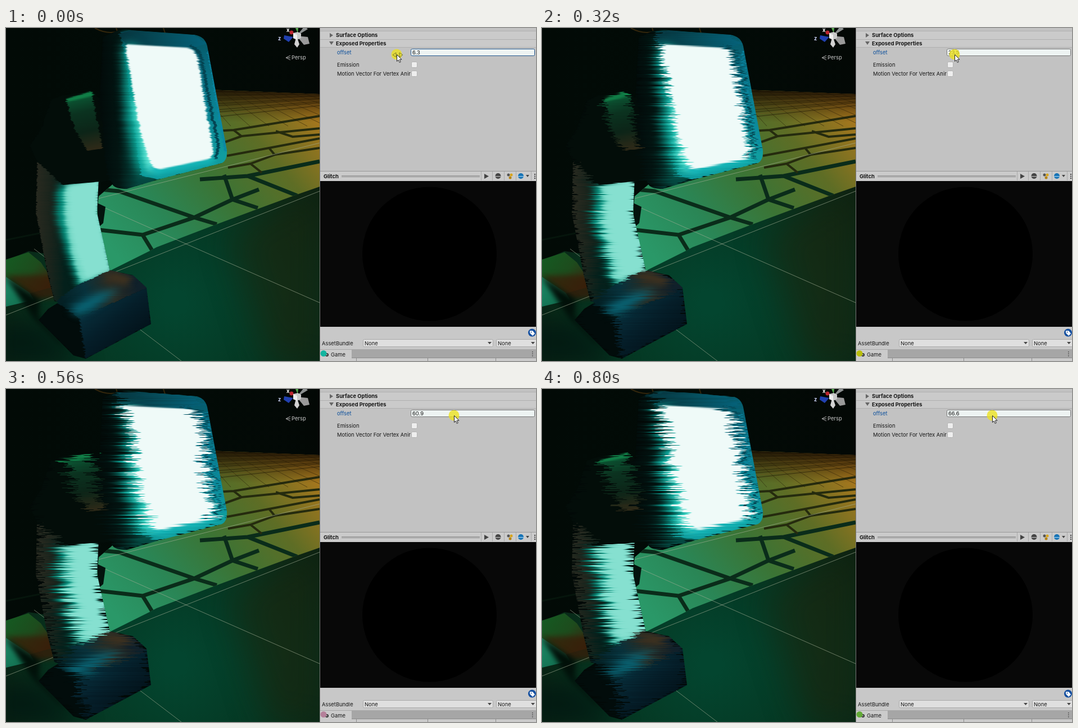
Write an HTML page with a canvas that moves like this. It is 943 px wide and 594 px high and loops after 840 ms.

```html
<!DOCTYPE html>
<html lang="en">
<head>
<meta charset="utf-8">
<title>Glitch offset</title>
<style>
html, body { margin: 0; height: 100%; overflow: hidden; background: #c2c2c2; }
canvas { display: block; }
</style>
</head>
<body>
<canvas id="stage" width="943" height="594"></canvas>
<script>
const W = 943, H = 594, VIEW = 558, LAMP_W = 420, LOOP = 840, STEP = 40;
const stage = document.getElementById('stage').getContext('2d');

function layer(width) {
  const canvas = document.createElement('canvas');
  canvas.width = width;
  canvas.height = H;
  return canvas.getContext('2d');
}

function fill(c, d, color, blur = 0) {
  c.filter = blur ? `blur(${blur}px)` : 'none';
  c.fillStyle = color;
  c.fill(new Path2D(d));
  c.filter = 'none';
}

function line(c, d, color, width = 1) {
  c.strokeStyle = color;
  c.lineWidth = width;
  c.stroke(new Path2D(d));
}

function rect(c, x, y, w, h, color) {
  c.fillStyle = color;
  c.fillRect(x, y, w, h);
}

function disc(c, x, y, r, color) {
  c.fillStyle = color;
  c.beginPath();
  c.arc(x, y, r, 0, 7);
  c.fill();
}

function text(c, s, x, y, color = '#161616', weight = 400) {
  c.font = `${weight} 9.4px Inter, sans-serif`;
  c.fillStyle = color;
  c.fillText(s, x, y);
}

function box(c, x, y, w, h, color, border) {
  c.beginPath();
  c.roundRect(x + .5, y + .5, w, h, 2);
  c.fillStyle = color;
  c.fill();
  c.strokeStyle = border;
  c.lineWidth = 1;
  c.stroke();
}

// Spreads the colours evenly between two points
function blend(c, x0, y0, x1, y1, ...colors) {
  const g = c.createLinearGradient(x0, y0, x1, y1);
  colors.forEach((color, i) => g.addColorStop(i / (colors.length - 1), color));
  return g;
}

function drawFloor(c) {
  c.save();
  c.beginPath();
  c.rect(0, 0, VIEW, H);
  c.clip();
  rect(c, 0, 0, VIEW, H, blend(c, 0, 0, VIEW, 0, '#020a06', '#020b07', '#030805'));
  line(c, 'M158 0Q180 12 200 6M196 0 200 12M280 0 284 12', '#33260c', 2);
  line(c, 'M0 378 60 366', '#06150c', 3);

  const glow = c.createRadialGradient(300, 490, 20, 300, 490, 330);
  glow.addColorStop(0, '#03452f');
  glow.addColorStop(.5, '#053823');
  glow.addColorStop(1, '#0b2212');
  fill(c, 'M0 415 40 398 185 420 558 270V594H0Z', glow);
  fill(c, 'M558 275V594H470L400 370Z', 'rgba(32,34,10,.5)', 30);

  // Lit patch and shadow left of the lamp
  fill(c, 'M0 413 40 400 62 418 90 460 40 474 0 445Z', blend(c, 0, 410, 80, 470, '#155a22', '#1d4c1d', '#3a2410'));
  fill(c, 'M0 444 42 472 50 485 0 497Z', blend(c, 0, 450, 50, 490, '#1c8462', '#127050'));
  fill(c, 'M0 442 85 440 100 480 52 484Z', 'rgba(58,28,8,.75)', 5);
  fill(c, 'M0 445 60 484 58 515 110 575 90 560 50 520Z', '#021009', 5);
  fill(c, 'M-20 525 60 520 140 600H-20Z', 'rgba(2,24,18,.8)', 20);

  // Lit tiles
  c.save();
  c.clip(new Path2D('M165 300 200 270 360 110 558 118V283L515 298 450 322 367 353 268 391 255 398 185 433 160 340Z'));
  rect(c, 150, 100, 420, 340, blend(c, 200, 410, 540, 140, '#2a9868', '#2a8656', '#3b7435', '#5e6d25', '#a8771d'));
  line(c, 'M168 288 200 291 335 338 375 350M388 262 403 306 335 338 243 369 165 360M403 306 448 321' +
    'M243 369 262 400M345 270 430 264 558 238M430 264 518 299M403 306 450 288', '#0a2c1a', 7);
  line(c, 'M370 184 405 182 558 157M405 182 419 193 558 179M419 193 380 207M393 228 468 214 558 197' +
    'M468 214 478 226 435 242 395 249M478 226 558 214M435 242 455 258M480 184 510 194 558 190', '#252b0e', 4);
  for (let i = 0; i < 17; i++) {
    const y = 110 + i * 1.7 + i * i * .09;
    line(c, `M360 ${y}L558 ${y + 7 - i * 1.8}`, i % 3 ? 'rgba(22,18,4,.65)' : 'rgba(190,130,50,.35)');
    line(c, `M${340 + i * 18} 108L${400 + i * 34} 175`, 'rgba(35,25,5,.5)');
  }
  rect(c, 350, 108, 208, 60, blend(c, 0, 108, 0, 168, 'rgba(22,13,3,.95)', 'rgba(50,32,6,.55)', 'rgba(60,40,8,0)'));
  c.restore();

  line(c, 'M0 512 558 291M165 316 320 385 558 490M50 394 312 594M165 304 558 205', 'rgba(165,175,150,.6)');
  fill(c, 'M162 312 177 319 173 348 164 356Z', '#03130d');
  c.restore();
}

const HEAD = 'M172 16 200 4Q212 1 225 4L335 12Q354 15 358 32L393 218Q394 236 384 241L272 270 215 287Q195 287 190 280L180 262 166 130Z';
const ARM = 'M80 128 100 120 152 112 172 130 190 272 100 280 55 238 42 210 62 180Z';
const LEG = 'M55 237 100 270 165 268 162 330 185 434 125 470 100 492 86 487 74 440 53 330Z';
const BASE = 'M58 521 75 501 96 488 125 460 185 432 226 441 250 463 258 528 142 590 120 584Z';

function drawMask(c) {
  for (const d of [HEAD, ARM, LEG, BASE]) fill(c, d, '#000');
}

// Painted a little past the outline, so shifted rows never run out of colour
function drawLamp(c) {
  rect(c, 0, 0, LAMP_W, H, '#020907');

  fill(c, LEG, blend(c, 53, 0, 105, 0, '#292a20', '#1a241c', '#04201b'));
  fill(c, 'M92 282 165 272 162 330 185 433 128 462 108 400 90 340Z', '#07917f', 6);
  fill(c, 'M104 281 165 271 163 330 185 433 132 455 116 400 104 340Z', '#74d8c6', 3);
  fill(c, 'M112 282 165 271 163 330 185 433 142 447 124 395 112 340Z', '#86e0d0', 3);

  fill(c, ARM, '#030d09');
  fill(c, 'M107 127 152 113 172 215 145 219 122 180Z', blend(c, 130, 115, 155, 218, '#0c6039', '#0b3320', '#0c2518', '#302a18'));
  fill(c, 'M107 127 152 113 155 121 112 131Z', '#118048', 1.5);

  fill(c, BASE, '#020c0b');
  fill(c, 'M88 488 125 460 185 432 226 441 252 463 130 517Z', blend(c, 100, 490, 230, 450, '#042024', '#08323c', '#2a2c24', '#10202a'));
  fill(c, 'M130 517 252 463 258 528 142 590Z', blend(c, 150, 490, 215, 570, '#08313e', '#051e29', '#03121a'));
  fill(c, 'M112 500 165 473 205 465 150 502 128 513Z', '#0a6676', 7);
  fill(c, 'M168 446 195 436 224 446 215 460Z', '#40321f', 6);

  fill(c, HEAD, blend(c, 165, 0, 235, 0, '#020a09', '#031512', '#05463f'));
  fill(c, 'M203 7 222 4 335 12 420 20V245L384 241 272 270 240 264 212 60Z',
    blend(c, 260, 0, 345, 240, '#044650', '#07677a', '#0a8192', '#109c9f'));
  fill(c, 'M200 10 225 4 335 12 357 28 330 36 212 29Z', blend(c, 200, 0, 355, 0, '#07343d', '#064c5a', '#05627a'));
  line(c, 'M328 31 345 45 378 210 374 234', '#044452', 5);
  line(c, 'M360 40 391 220', '#0b87a5', 4);
  fill(c, 'M207 30 232 30 275 255 235 258 215 170Z', '#0ba698', 9);
  fill(c, 'M225 130 245 130 275 253 250 255Z', '#63e8d8', 6);
  fill(c, 'M250 248 368 228 372 240 268 262Z', '#15b6b8', 5);
  fill(c, 'M216 29 320 35Q336 38 340 52L369 220Q370 231 360 234L278 251Q264 254 258 243L240 190 212 36Z', '#effaf8', 1);
}

function drawGizmo(c) {
  fill(c, 'M517 14 537 2 531 -3Z', '#8c9090');
  fill(c, 'M517 14 537 16 540 28 530 30Z', '#9a9a9a');
  fill(c, 'M517 14 513 29 518 35 522 29Z', '#d2d2d2');
  fill(c, 'M515 0H520L519 9Z', '#52a34a');
  disc(c, 508, 8, 3.5, '#bd2630');
  fill(c, 'M511 16 495 13 494 19 503 25Z', '#2140b0');
  fill(c, 'M511 9 519 7 525 10V18L518 21 511 18Z', '#c9c9c9');
  fill(c, 'M511 9 518 12V21L511 18Z', '#eee');
  text(c, 'x', 499, 7, '#fff', 700);
  text(c, 'z', 484, 22, '#cdd4ff', 700);
  line(c, 'M506 49 498 53 506 57M498 53H506', '#aaa');
  text(c, 'Persp', 508, 56, '#ccc');
}

function drawPanel(c) {
  rect(c, VIEW, 0, W - VIEW, H, '#c2c2c2');
  rect(c, VIEW, 0, 1, H, '#777');
  rect(c, 559, 6, 384, 28, '#cacaca');
  for (const y of [5, 20, 34]) rect(c, 559, y, 384, 1, '#b0b0b0');
  fill(c, 'M576 9 582 13 576 17Z', '#666');
  fill(c, 'M575 24H583L579 30Z', '#666');
  text(c, 'Surface Options', 587, 16, '#161616', 700);
  text(c, 'Exposed Properties', 587, 31, '#161616', 700);
  text(c, 'offset', 589, 47, '#0b4f9c');
  text(c, 'Emission', 589, 69);
  text(c, 'Motion Vector For Vertex Anir', 589, 85);
  for (const y of [60, 76]) box(c, 721, y, 10, 10, '#eee', '#b2b2b2');

  rect(c, 559, 256, 384, 17, '#cbcbcb');
  rect(c, 559, 255, 384, 1, '#999');
  text(c, 'Glitch', 565, 268, '#161616', 700);
  line(c, 'M597 263.5H843M597 265.5H843', '#8a8a8a');
  line(c, 'M845.5 256V272M865.5 256V272M886.5 256V272M907.5 256V272M934.5 256V272', '#aaa');
  fill(c, 'M851 260 859 264.500 851 269Z', '#444');
  disc(c, 875.5, 264, 5, '#444');
  rect(c, 870, 264, 11, 1.5, '#aaa');
  disc(c, 894, 262, 2.5, '#555');
  disc(c, 899, 262, 2.5, '#d8a51c');
  disc(c, 897, 267, 2.5, '#b58416');
  disc(c, 916, 264, 5, '#1673b5');
  rect(c, 911, 264, 10, 1.5, '#8dc4e8');
  fill(c, 'M925 262H931L928 266Z', '#444');
  for (const y of [260, 263.500, 267]) rect(c, 940, y, 2, 2, '#444');

  rect(c, 559, 273, 384, 260, '#080808');
  disc(c, 753.5, 403, 119.5, '#000');

  rect(c, 559, 533, 384, 40, '#c8c8c8');
  disc(c, 936, 543.5, 7, '#1550a0');
  fill(c, 'M932 540H937L941 545 937 549 932 544Z', '#fff');
  disc(c, 934.5, 542.5, 1, '#1550a0');
  text(c, 'AssetBundle', 562, 566);
  box(c, 635, 555, 231, 13, '#dfdfdf', '#aaa');
  box(c, 872, 555, 75, 13, '#dfdfdf', '#aaa');
  text(c, 'None', 638, 566);
  text(c, 'None', 875, 566);
  fill(c, 'M857 560H864L860.5 564Z', '#444');
  fill(c, 'M934 560H941L937.5 564Z', '#444');

  rect(c, 559, 573, 384, 16, '#a6a6a6');
  rect(c, 559, 574, 56, 15, '#cbcbcb');
  rect(c, 559, 589, 384, 5, '#cbcbcb');
  rect(c, 615, 588, 328, 1, '#8c8c8c');
  for (const x of [623, 750, 871]) rect(c, x, 589, 1, 5, '#8c8c8c');
  line(c, 'M569 583a2 2 0 1 0 4 0a2 2 0 1 0-4 0', '#333', 2);
  text(c, 'Game', 578, 586);
  for (const y of [577, 580.500, 584]) rect(c, 936, y, 1.5, 1.5, '#444');
}

// time, pointer x, offset value
const drag = [[0, 695, 6.3], [160, 707, 13.8], [320, 734, 23.5], [480, 778, 51.7],
  [560, 797, 60.9], [600, 801, 66.6], [LOOP, 801, 66.6]];
const dots = [[0, '#12b5a0'], [80, '#b0202c'], [240, '#b9be0c'], [520, '#b5819a'],
  [600, '#26349c'], [760, '#62aa36']];

function dragAt(t) {
  const i = drag.findIndex(k => k[0] > t);
  const a = drag[i - 1], b = drag[i], p = (t - a[0]) / (b[0] - a[0]);
  return [a[1] + (b[1] - a[1]) * p, a[2] + (b[2] - a[2]) * p];
}

function random(n, seed) {
  const v = Math.sin(n * 127.1 + seed * 311.7 + 7) * 43758.5453;
  return v - Math.floor(v);
}

const backdrop = layer(W), art = layer(LAMP_W), mask = layer(LAMP_W), lamp = layer(LAMP_W);
drawFloor(backdrop);
drawGizmo(backdrop);
drawPanel(backdrop);
drawLamp(art);
drawMask(mask);

function drawGlitch(offset, seed) {
  const reach = 24 * (1 - Math.exp(-((offset / 28) ** 1.3)));
  lamp.globalCompositeOperation = 'source-over';
  lamp.drawImage(art.canvas, 0, 0);
  for (let y = 0; y < H; y++) {
    const shift = reach * (random(y, seed) + random(y >> 1, seed + 50) - 1);
    lamp.drawImage(art.canvas, 0, y, LAMP_W, 1, shift, y, LAMP_W, 1);
  }
  lamp.globalCompositeOperation = 'destination-in';
  lamp.drawImage(mask.canvas, 0, 0);
  stage.drawImage(lamp.canvas, 0, 0);
}

function drawPointer(x, resizing) {
  disc(stage, x, 47, 9.5, 'rgba(236,224,28,.78)');
  if (resizing) line(stage, `M${x - 1} 44l-6 4 6 4zM${x + 5} 44l6 4-6 4z`, 'rgba(95,95,20,.75)');
  const arrow = `M${x + .5} 47.500v12l2.700-2.500 2 4.500 2-1-2-4.300h3.800z`;
  fill(stage, arrow, '#fff');
  line(stage, arrow, '#222');
}

let shown = -1;
function frame(now) {
  let tick = Math.floor(now % LOOP / STEP);
  if (tick === 9) tick = 8; // the picture rests for one step here
  if (tick !== shown) {
    shown = tick;
    const t = tick * STEP;
    const [x, offset] = dragAt(t);
    const resizing = x < 720;
    stage.drawImage(backdrop.canvas, 0, 0);
    drawGlitch(offset, tick);
    box(stage, 720, 37, 220, 12, '#edf3f2', resizing ? '#24588f' : '#777');
    text(stage, offset.toFixed(1), 723, 47);
    disc(stage, 565, 580.5, 5.5, dots.findLast(d => d[0] <= t)[1]);
    drawPointer(x, resizing);
  }
  requestAnimationFrame(frame);
}
requestAnimationFrame(frame);
</script>
</body>
</html>
```
